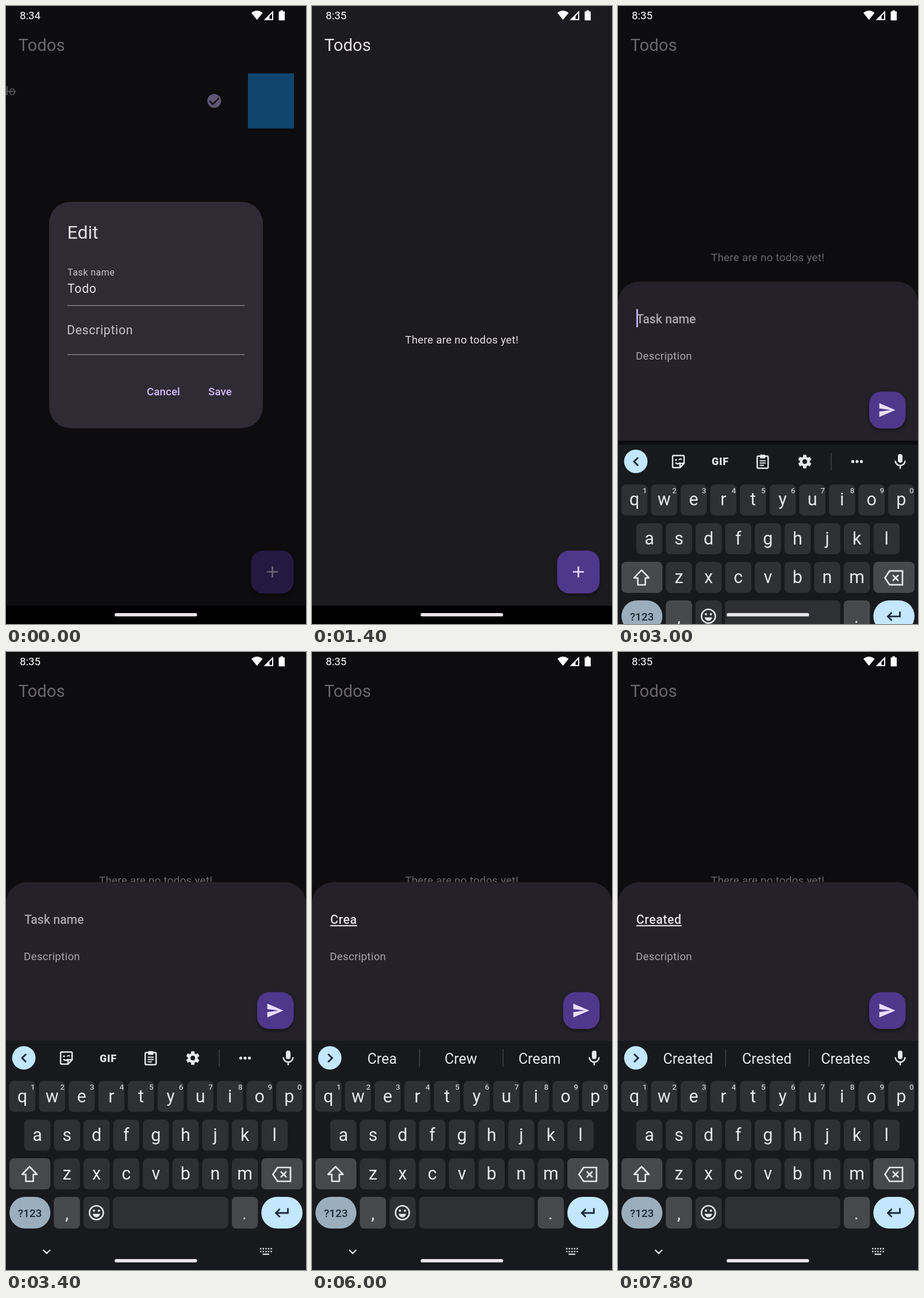
Recreate the animation shown at these times as an HTML page. Size 522 by 1073 pixels, loop 8 s.

```html
<!DOCTYPE html>
<html lang="en">
<head>
<meta charset="utf-8">
<title>Todos</title>
<style>
  html, body { margin: 0; width: 100%; height: 100%; overflow: hidden; background: #000; }
  svg { display: block; width: 100%; height: 100%; }
  text { font-family: Roboto, "Noto Sans", sans-serif; white-space: pre; }
  .mid { text-anchor: middle; }
  .fab { filter: drop-shadow(0 3px 3px rgba(0, 0, 0, .4)); }
  .line { fill: none; stroke-linecap: butt; stroke-linejoin: miter; }
</style>
</head>
<body>
<svg id="stage" viewBox="0 0 522 1073"></svg>
<script>
const LOOP = 8000, STEP = 200;
const CUT = 1400, FOCUS = 2800;
const LIFT = 365.4;
const PALE = '#e6e1e5', ICON = '#e7e8eb', SKY = '#c2e7ff', INK = '#1b2a35';
const KEYBOARD = '#17191c', KEY = '#2f3033', SIDE_KEY = '#47484b';

const stage = document.getElementById('stage');

const typed = [[FOCUS, ''], [4600, 'C'], [4800, 'Cr'], [5000, 'Cre'], [5400, 'Crea'],
  [6600, 'Creat'], [7000, 'Create'], [7200, 'Created']];

const suggestions = {
  C: ['C', 'Can', 'Could'],
  Cr: ['Cr', 'Crazy'],
  Cre: ['Cre', 'Crew', 'Cream'],
  Crea: ['Crea', 'Crew', 'Cream'],
  Creat: ['Creat', 'Create', 'Creates'],
  Create: ['Create', 'Created', 'Creates'],
  Created: ['Created', 'Crested', 'Creates']
};

// key, press time, release time, end of touch dot, dot offset from key centre
const presses = [
  ['c', 4400, 4600, 4600, 0, 6],
  ['r', 4600, 4800, 5000, -6, 10],
  ['e', 4800, 5000, 5000, 0, 5],
  ['a', 5200, 5400, 5400, 2, 5],
  ['t', 6400, 6600, 6600, 1, 6],
  ['e', 6800, 7000, 7000, 0, 5],
  ['d', 7000, 7200, 7200, 2, 5]
];

const keys = {};
['qwertyuiop', 'asdfghjkl', 'zxcvbnm'].forEach((row, r) =>
  [...row].forEach((letter, i) => {
    keys[letter] = {
      x: [28.5, 54.5, 106][r] + i * 51.6,
      y: 771.7 + r * 67.2,
      digit: r ? '' : (i + 1) % 10
    };
  }));

const clamp = v => Math.max(0, Math.min(1, v));
const easeOut = v => 1 - (1 - clamp(v)) ** 3;

const rect = (x, y, w, h, r, fill, more = '') =>
  `<rect x="${x}" y="${y}" width="${w}" height="${h}" rx="${r}" fill="${fill}" ${more}/>`;
const circle = (x, y, r, fill, more = '') =>
  `<circle cx="${x}" cy="${y}" r="${r}" fill="${fill}" ${more}/>`;
const text = (x, y, size, fill, str, more = '') =>
  `<text x="${x}" y="${y}" font-size="${size}" fill="${fill}" ${more}>${str}</text>`;
const path = (d, fill, more = '') => `<path d="${d}" fill="${fill}" ${more}/>`;
const line = (d, color, width) =>
  `<path d="${d}" class="line" stroke="${color}" stroke-width="${width}"/>`;
const shift = (y, body) => `<g transform="translate(0 ${y})">${body}</g>`;
const spacing = n => `letter-spacing="${n}"`;

function statusBar(clock) {
  return text(24, 23, 18.7, '#fff', clock) +
    path('M427 12Q436.5 4 446.500 12L436.700 24Z', '#fff') +
    path('M448.500 24.500H465V8ZM458.500 22.500H463V13L458.500 17.500Z', '#fff', 'fill-rule="evenodd"') +
    path('M477.500 9.500V7.500H482V9.500H485V25H474.500V9.500Z', '#fff', 'stroke-linejoin="round"');
}

function listScreen(lift, empty) {
  const fab = `<g class="fab">${rect(426.5, 945.5, 74, 74.5, 21, '#4f378b')}</g>` +
    line('M454 982.500H473M463.500 973V992', '#eaddff', 2.7);
  const item = rect(421, 117, 80, 95.5, 0, '#2196f3') +
    text(-33, 155, 21.3, '#b3b0b6', 'Todo', spacing(.67) + ' text-decoration="line-through"') +
    circle(362.3, 164.7, 12, '#d0bcff') +
    line('M354.500 165L360 170.500L370.500 160', '#1c1b1f', 2.6);
  return rect(0, 0, 522, 1041, 0, '#1c1b1f') +
    text(21.5, 78, 29.3, PALE, 'Todos') +
    (empty
      ? text(260.7, 586 - lift / 2, 18.65, PALE, 'There are no todos yet!', 'class="mid" ' + spacing(.33))
      : item) +
    shift(-lift, fab);
}

function editDialog() {
  const rule = y => rect(107, y, 308, 1.3, 0, '#918e98');
  const label = '#c9c4cf', action = '#d0bcff';
  return rect(75, 340, 372, 393, 37, '#2e2b34') +
    text(106.5, 403.5, 32, PALE, 'Edit') +
    text(107, 468, 16, label, 'Task name', spacing(.5)) +
    text(107, 498, 21.3, PALE, 'Todo', spacing(.67)) + rule(519.5) +
    text(106, 570, 21.3, label, 'Description', spacing(.67)) + rule(604.7) +
    text(245, 676, 18.65, action, 'Cancel', 'font-weight="500" ' + spacing(.13)) +
    text(352, 676, 18.65, action, 'Save', 'font-weight="500" ' + spacing(.13));
}

function sheet(value, caretOn) {
  const name = value
    ? text(31.8, 837.5, 21.3, PALE, value,
        'id="value" font-weight="500" text-decoration="underline" ' + spacing(.6))
    : text(32, 837.5, 21.3, '#a9a6ac', 'Task name', 'font-weight="500"');
  return path('M0 1041V802A37 37 0 0 1 37 765H485A37 37 0 0 1 522 802V1041Z', '#242129') +
    name +
    (caretOn ? rect(32, 812.5, 2.6, 32, 1, '#d0bcff', 'id="caret"') : '') +
    text(31, 900, 18.65, '#a9a6ac', 'Description', spacing(.33)) +
    `<g class="fab">${rect(437, 956, 63.5, 64, 21, '#4f378b')}</g>` +
    path('M2 21L23 12L2 3V10L17 12L2 14Z', '#eaddff', 'transform="translate(452 972) scale(1.33)"');
}

function laughing(x, y) {
  return `<g transform="translate(${x} ${y}) rotate(-28)">` +
    circle(0, 0, 12.5, '#fcc934') +
    path('M-8 1H8Q7 11 0 11Q-7 11 -8 1Z', '#5f3a20') + path('M-6 2H6V4H-6Z', '#fff') +
    line('M-8-5L-3-3L-8-1M8-5L3-3L8-1', '#5f3a20', 1.8) +
    path('M-9-1Q-15 4 -12 7Q-8 7 -9-1ZM9-1Q15 4 12 7Q8 7 9-1Z', '#45a5ef') + '</g>';
}

function anguished(x, y) {
  return `<g transform="translate(${x} ${y})">` +
    circle(0, 0, 12.5, '#fcc934') +
    circle(-4.5, -2, 3.2, '#fff') + circle(4.5, -2, 3.2, '#fff') +
    circle(-4.5, -2, 1.6, '#5f3a20') + circle(4.5, -2, 1.6, '#5f3a20') +
    line('M-10-6Q-6-7 -4-9M10-6Q6-7 4-9', '#5f3a20', 1.5) +
    path('M-5 8Q0 1 5 8Q0 10 -5 8Z', '#5f3a20') + '</g>';
}

function toolbar() {
  const teeth = Array.from({ length: 6 }, (_, i) =>
    rect(-3, -11.7, 6, 7, 1, ICON, `transform="translate(325 705) rotate(${i * 60})"`)).join('');
  return line('M35 698L28 705L35 712', INK, 3) +
    line('M97 694.500H113A2 2 0 0 1 115 696.500V708L108 715.500H97A2 2 0 0 1 95 713.500V696.500A2 2 0 0 1 97 694.500Z' +
      'M108 715V708H115M100 707Q104 711 108 707', ICON, 2.5) +
    circle(101, 702, 1.7, ICON) + line('M106 702.500Q108.500 699 111 702', ICON, 2) +
    text(178, 711.5, 18, ICON, 'GIF', 'class="mid" font-weight="900" ' + spacing(.8)) +
    rect(242.2, 695.5, 19, 21, 2, 'none', `stroke="${ICON}" stroke-width="2.5"`) +
    rect(247, 693, 9.5, 6.5, 1.5, ICON) +
    line('M246.500 703.500H257M246.500 707.500H257M246.500 711.500H254', ICON, 2) +
    teeth + circle(325, 705, 8.7, ICON) + circle(325, 705, 4, KEYBOARD) +
    rect(370.3, 690, 1.3, 30, 0, '#46494d') +
    [408.5, 416, 423.500].map(x => circle(x, 705, 2.6, ICON)).join('');
}

function suggestionBar(value) {
  const words = suggestions[value];
  const divider = x => rect(x, 689, 1.3, 31, 0, '#46494d');
  return line('M28 698L35 705L28 712', INK, 3) + divider(186.7) + divider(331.8) +
    words.map((word, i) => text(122 + i * 137, 715, 25, ICON, word, 'class="mid"')).join('') +
    (words.length < 3 ? laughing(365, 704.5) + divider(396) + anguished(429.5, 705) : '');
}

function letterKey(letter, upper, pressed) {
  const { x, y, digit } = keys[letter];
  const label = upper ? letter.toUpperCase() : letter;
  const body = text(x, y + 9.8, 30.5, ICON, label, 'class="mid"') +
    text(x + 18, y - 11.7, 13.5, '#c6c8cb', digit, 'class="mid" font-weight="500"');
  return pressed
    ? `<g opacity=".35">${body}</g>`
    : rect(x - 22.8, y - 26.9, 45.6, 53.8, 8, KEY) + body;
}

function popup(letter, upper) {
  const { x, y } = keys[letter];
  return circle(x, y - 70.7, 36, KEY) +
    text(x, y - 57, 31, ICON, upper ? letter.toUpperCase() : letter, 'class="mid"') +
    [-5, 0, 5].map(d => circle(x + d, y - 42.2, 1.6, ICON)).join('');
}

function touchDot([letter, , release, , dx, dy], t) {
  const { x, y } = keys[letter];
  const down = t < release;
  return circle(x + dx, y + dy, 11.5, '#c3cbe0',
    `fill-opacity="${down ? .62 : .5}" stroke="${down ? '#a9c0f2' : '#8796c0'}" stroke-width="1.3"`);
}

function functionKeys(upper) {
  const arrow = 'M41 893.500L54 907H47.500V919H34.500V907H28Z';
  return rect(6, 879, 71.3, 54, 8, SIDE_KEY) +
    path(arrow, upper ? ICON : 'none', `stroke="${ICON}" stroke-width="2.6" stroke-linejoin="round"`) +
    rect(444.3, 879, 71.7, 54, 8, SIDE_KEY) +
    line('M464.500 907L472.500 895H495V919H472.500ZM478 902L488 912M488 902L478 912', ICON, 2.7) +
    rect(6, 946, 71.3, 55, 27.5, '#9aaebd') +
    text(41.5, 981, 19, INK, '?123', 'class="mid" font-weight="500"') +
    rect(83.2, 946, 45.6, 55, 8, SIDE_KEY) + text(106, 985, 30, ICON, ',', 'class="mid"') +
    rect(134.8, 946, 45.6, 55, 8, KEY) +
    circle(157.3, 973.5, 12, 'none', `stroke="${ICON}" stroke-width="2.6"`) +
    circle(153, 970, 2, ICON) + circle(161.600, 970, 2, ICON) +
    path('M150.500 975.500H164Q162 981.500 157.300 981.500Q152.500 981.500 150.500 975.500Z', ICON) +
    rect(186.2, 946, 200.6, 55, 8, KEY) +
    rect(392.8, 946, 45.6, 55, 8, SIDE_KEY) + text(415, 985, 30, ICON, '.', 'class="mid"') +
    rect(444.3, 946, 71.7, 55, 27.5, SKY) +
    line('M490.500 965.500V974H470M476.500 967L469.500 974L476.500 981', INK, 2.8);
}

function keyboard(t, value) {
  const upper = t >= 4000 && t < 4600;
  const held = presses.filter(p => t >= p[1] && t < p[2]).map(p => p[0]);
  const touches = presses.filter(p => t >= p[1] && t < p[3]);
  const mic = rect(487, 692, 8, 15, 4, ICON) +
    line('M482.500 703.500A8.500 8.500 0 0 0 499.500 703.500M491 712V717.500', ICON, 2.5);
  const switcher = [1036, 1041].map(y =>
    `<path d="M442 ${y}H463" stroke="${ICON}" stroke-width="2.4" stroke-dasharray="2.4 2.2"/>`).join('') +
    rect(446.5, 1044.5, 11.5, 2.2, 0, ICON);
  return rect(0, 675.5, 522, 398, 0, KEYBOARD) +
    circle(31, 704.7, 20.4, SKY) +
    (value ? suggestionBar(value) : toolbar()) + mic +
    Object.keys(keys).map(k => letterKey(k, upper, held.includes(k))).join('') +
    functionKeys(upper) +
    line('M64.500 1038L70.700 1044L77 1038', ICON, 2.4) + switcher +
    held.map(k => popup(k, upper)).join('') +
    touches.map(p => touchDot(p, t)).join('');
}

function draw(t) {
  const editing = t < CUT;
  const sheetIn = easeOut((t - 1500) / 280);
  const keysIn = easeOut((t - 2880) / 300);
  const lift = LIFT * keysIn;
  const [changed, value] = typed.filter(e => e[0] <= t).pop() || [0, ''];
  const caretOn = t >= FOCUS && (t - changed) % 1000 < 500;
  const scrim = .54 * (editing ? 1 : sheetIn);

  stage.innerHTML =
    listScreen(lift, !editing) +
    rect(0, 0, 522, 1041, 0, '#000', `opacity="${scrim}"`) +
    (editing ? editDialog() : '') +
    (!editing && sheetIn ? shift(276 * (1 - sheetIn) - lift, sheet(value, caretOn)) : '') +
    rect(0, 1041, 522, 32, 0, '#000') +
    (keysIn ? shift(398 * (1 - keysIn), keyboard(t, value)) : '') +
    statusBar(editing ? '8:34' : '8:35') +
    rect(189, 1054, 143.5, 5.8, 2.9, '#ece6ee');

  const field = document.getElementById('value');
  const caret = document.getElementById('caret');
  if (field && caret) caret.setAttribute('x', 32 + field.getComputedTextLength());
}

const start = performance.now();
let shown = -1;
function tick() {
  const t = Math.floor(((performance.now() - start) % LOOP) / STEP) * STEP;
  if (t !== shown) draw(shown = t);
  requestAnimationFrame(tick);
}
tick();
</script>
</body>
</html>
```
